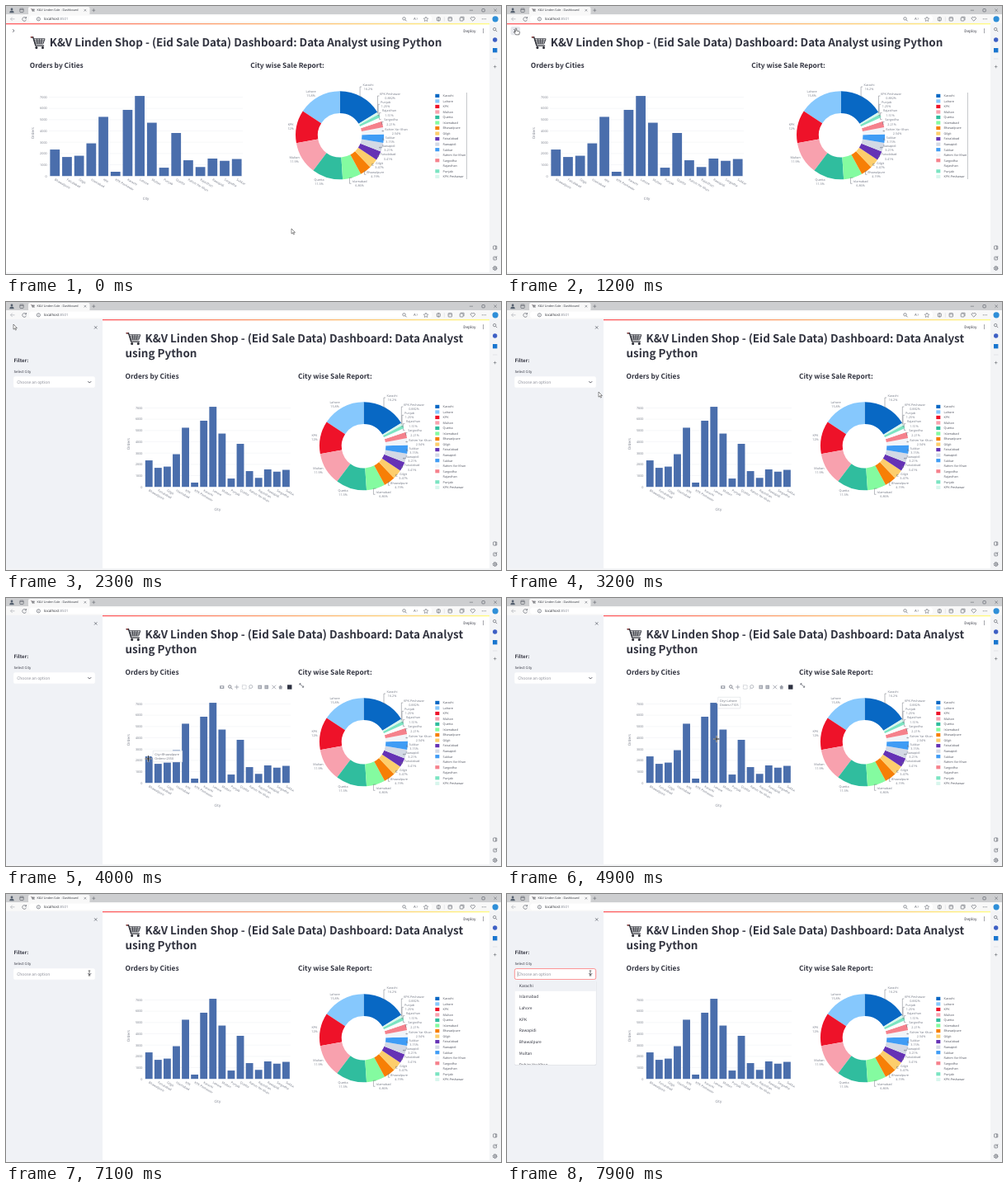
Animation of 600x325 px, one loop 8 s. Source, as an HTML page:

```html
<!DOCTYPE html>
<html lang="en">
<head>
<meta charset="utf-8">
<title>Sales dashboard</title>
<style>
  html, body { margin: 0; width: 100%; height: 100%; overflow: hidden; background: #f3f4f6; }
  svg { display: block; width: 600px; height: 325px; }
  text { text-rendering: geometricPrecision; white-space: pre; }
  .ui { font-family: "Noto Sans CJK JP", "Noto Sans CJK SC", "Noto Sans CJK", "Noto Sans", sans-serif; }
  .plot { font-family: "Open Sans", "Noto Sans", sans-serif; }
</style>
</head>
<body>
<svg id="stage" viewBox="0 0 600 325">
  <g id="scene"></g>
  <g id="chrome"></g>
  <g id="cursor"></g>
</svg>
<script>
const LOOP = 8000, STEP = 100, SIDE = 117, RIGHT = 558;
const INK = '#31333f', GREY = '#747986';
const TITLE = ['K&V Linden Shop - (Eid Sale Data) Dashboard: Data Analyst', 'using Python'];

const BARS = [
  ['Bhawalpure', 2350], ['Faisalabad', 1690], ['Gilgit', 1800], ['Islamabad', 2900],
  ['KPK', 5250], ['KPK-Peshawar', 380], ['Karachi', 5870], ['Lahore', 7105],
  ['Multan', 4730], ['Punjab', 740], ['Quetta', 3820], ['Rahim Yar Khan', 1400],
  ['Rajasthan', 800], ['Rawapidi', 1550], ['Sargodha', 1350], ['Sukkar', 1510]
];

// name, percent, colour, label centre relative to the ring centre
const SLICES = [
  ['Karachi', 16.2, '#0868c4', 34.5, -58.8], ['Lahore', 15.8, '#86c8fd', -35, -50.5],
  ['KPK', 12, '#ee1229', -59.5, -11], ['Multan', 11.9, '#f8a1ae', -55, 29.5],
  ['Quetta', 11.3, '#30bd9e', -25, 56], ['Islamabad', 6.86, '#84fba0', 24, 58.5],
  ['Bhawalpure', 4.19, '#f77f06', 43, 47.5], ['Gilgit', 3.47, '#fdce6c', 48, 36.5],
  ['Faisalabad', 3.41, '#6532b5', 58.5, 25.8], ['Rawapidi', 3.21, '#d3d9e5', 59, 15.2],
  ['Sukkar', 3.15, '#3f9cf5', 61, 5.5], ['Rahim Yar Khan', 2.54, '#f1f4f9', 68.5, -5],
  ['Sargodha', 2.21, '#f5818c', 62, -16.2], ['Rajasthan', 1.51, '#fcfcfd', 60, -27.2],
  ['Punjab', 1.25, '#7be4c2', 55.5, -37.5], ['KPK-Peshawar', 0.882, '#d8f6ed', 61, -47.8]
];
const RING = 53.5, HOLE = 26.8, TOTAL = SLICES.reduce((sum, s) => sum + s[1], 0);

const OPTIONS = ['Karachi', 'Islamabad', 'Lahore', 'KPK', 'Rawapidi', 'Bhawalpure', 'Multan', 'Rahim Yar Khan'];

const SIDE_KEYS = [[1900, 0], [2000, 7], [2100, 58], [2200, 104], [2300, SIDE]];
const CURSOR_KEYS = [
  [0, 346, 270], [200, 346, 270], [900, 20, 40], [1100, 11, 30], [1900, 11, 30], [2000, 9, 27],
  [2600, 9, 27], [3100, 111, 109], [3400, 111, 109], [4100, 176, 200], [4900, 254, 171],
  [5300, 256, 168], [5900, 467, 139], [6300, 467, 139], [7100, 101, 96]
];
const OPEN_AT = 7300;

const $ = id => document.getElementById(id);
const esc = s => String(s).replace(/&/g, '&amp;').replace(/</g, '&lt;');
const rect = (x, y, w, h, fill, more = '') =>
  `<rect x="${x}" y="${y}" width="${w}" height="${h}" fill="${fill}" ${more}/>`;
const disc = (x, y, r, fill, more = '') => `<circle cx="${x}" cy="${y}" r="${r}" fill="${fill}" ${more}/>`;
const line = (d, stroke = GREY, width = .6, more = '') =>
  `<path d="${d}" fill="none" stroke="${stroke}" stroke-width="${width}" ${more}/>`;
const group = (x, y, body) => `<g transform="translate(${x} ${y})">${body}</g>`;
// y is the middle of the capitals
const text = (x, y, str, size, fill = INK, cls = 'ui', more = '') =>
  `<text class="${cls}" x="${x}" y="${y + size * .35}" font-size="${size}" fill="${fill}" ${more}>${esc(str)}</text>`;
const label = (x, y, str, more = '', size = 3.75) => text(x, y, str, size, GREY, 'plot', more);
const BOLD = 'font-weight="700"', MID = 'text-anchor="middle"';

function at(keys, t) {
  let i = 0;
  while (i < keys.length - 1 && keys[i + 1][0] <= t) i++;
  const a = keys[i], b = keys[i + 1];
  if (!b || t <= a[0]) return a.slice(1);
  const p = (t - a[0]) / (b[0] - a[0]), e = p * p * (3 - 2 * p);
  return a.slice(1).map((v, k) => v + (b[k + 1] - v) * e);
}

function layout(side) {
  const left = 28.7 + side * (115.8 / SIDE), col = (RIGHT - left - 5) / 2;
  const dy = side > 28 ? 18 : 0;
  return {
    side, left, col, dy, col2: left + col + 5.3,
    barX: left + 23.2, pitch: (col - 27) / BARS.length, base: 206.2 + dy,
    cx: 404.6 + 28.9 * side / SIDE, cy: 156.8 + dy
  };
}
const barTop = (g, i) => g.base - BARS[i][1] * .01367;

// Karachi runs clockwise from the top, all the others anticlockwise
const arcs = (() => {
  let turn = 0;
  return SLICES.map((s, i) => {
    const span = s[1] / TOTAL * Math.PI * 2;
    if (i === 0) return [0, span];
    turn -= span;
    return [turn, turn + span];
  });
})();
const polar = (g, r, a) => [g.cx + r * Math.sin(a), g.cy - r * Math.cos(a)];

function hoverAt(g, x, y) {
  const i = Math.floor((x - g.barX) / g.pitch);
  if (i >= 0 && i < BARS.length && y < g.base && y > barTop(g, i)) return { kind: 'bar', i };
  const r = Math.hypot(x - g.cx, y - g.cy);
  if (r < HOLE || r > RING) return null;
  const a = Math.atan2(x - g.cx, g.cy - y), full = Math.PI * 2;
  const k = arcs.findIndex(([p, q]) => [a, a - full].some(v => v >= p && v < q));
  return k < 0 ? null : { kind: 'slice', i: k };
}

function cart() {
  return line('M0 1.2H2.8L6 11.6H16.2', '#2f3038', 1.4) +
    line('M3.6 3.3H17.2L15 9.4H5.4ZM4.3 5.4H16.4M5 7.4H15.7M7.5 3.3L8.2 9.4M10.4 3.3V9.4M13.4 3.3L12.6 9.4', '#34363f', .95) +
    line('M0 1.2H2.3', '#8f3a3b', 1.4) +
    disc(7, 14, 1.5, '#26272f') + disc(14.6, 14, 1.5, '#26272f');
}

function barChart(g) {
  const end = g.barX + g.pitch * BARS.length;
  let out = '';
  for (let k = 0; k <= 7; k++) {
    const y = g.base - k * 13.67;
    out += line(`M${g.barX} ${y}H${end}`, '#eceef2', .5) +
      label(g.barX - 2.2, y, k * 1000, 'text-anchor="end"');
  }
  BARS.forEach(([name], i) => {
    const x = g.barX + g.pitch * (i + .5), top = barTop(g, i), w = g.pitch * .8;
    out += rect(x - w / 2, top, w, g.base - top, '#4a6eac') +
      `<g transform="translate(${x} ${g.base + 4}) rotate(30)">${label(0, 0, name)}</g>`;
  });
  out += label((g.barX + end) / 2, g.base + 27.3, 'City', MID, 4.4) +
    `<g transform="translate(${g.left + 4.2} ${g.base - 52}) rotate(-90)">${label(0, 0, 'Orders', MID, 4.4)}</g>`;
  return `<clipPath id="col"><rect x="0" y="0" width="${g.left + g.col}" height="325"/></clipPath>` +
    `<g clip-path="url(#col)">${out}</g>`;
}

function pieChart(g) {
  let out = '';
  SLICES.forEach(([name, pct, fill, lx, ly], i) => {
    const [a, b] = arcs[i];
    const [p, q, r, s] = [polar(g, RING, a), polar(g, RING, b), polar(g, HOLE, b), polar(g, HOLE, a)];
    out += `<path fill="${fill}" d="M${p}A${RING} ${RING} 0 0 1 ${q}L${r}A${HOLE} ${HOLE} 0 0 0 ${s}Z"/>`;
    const x = g.cx + lx, y = g.cy + ly;
    if (i === 0 || i > 4) {
      const edge = x - name.length * 1.03 - .8, [mx, my] = polar(g, RING, (a + b) / 2);
      out += line(`M${mx} ${my}H${edge - 2}V${y}H${edge}`, '#70747f', .5);
    }
    out += label(x, y - 2.5, name, MID) + label(x, y + 2.6, pct + '%', MID);
    const row = 108.9 + g.dy + i * 6.53;
    out += rect(520.3, row - 2.1, 5, 4.2, fill) + text(529.6, row, name, 3.75, '#4e525e', 'plot');
  });
  if (!g.side) out += line('M558.4 105V210', '#a9acb4', .7);
  return out;
}

function sidebar(g, open) {
  if (!g.side) return '';
  let out = rect(0, 21, SIDE, 302, '#f0f2f6') +
    line('M107 29.2l3.4 3.4m0-3.4l-3.4 3.4', '#555964', .7) +
    text(9.5, 71, 'Filter:', 5.95, INK, 'ui', BOLD) +
    text(9.5, 84.3, 'Select City', 4.25) +
    rect(9.3, 90.6, 98.4, 13, '#fff', `rx="2.2" stroke="${open ? '#ff4b4b' : '#fff'}" stroke-width=".6"`) +
    text(13.2, 97, 'Choose an option', 4.9, '#8b8d98') +
    line('M99.4 96.2l1.9 1.9 1.9-1.9', INK, .8);
  if (open) {
    out += line('M13 93.8V100.3', INK, .4) +
      rect(9, 104.8, 99.4, 103.2, '#c9ccd4', 'rx="2" opacity=".5"') +
      rect(9.3, 104.2, 98.6, 103, '#fff', 'rx="2"') + rect(9.3, 104.6, 98.6, 13.2, '#eff1f5') +
      '<clipPath id="menu"><rect x="9" y="104" width="99" height="103"/></clipPath><g clip-path="url(#menu)">' +
      OPTIONS.map((name, i) => text(14.8, 111 + i * 13.7, name, 4.8)).join('') + '</g>';
  }
  return group(g.side - SIDE, 0, out);
}

function modebar(g, right, full) {
  const y = 90 + g.dy, x = right - 5, c = '#9da1ab';
  const lens = disc(-.5, -.5, 1.7, 'none', 'stroke="#555a66" stroke-width=".7"') + line('M.8 .8l1.8 1.8', '#555a66', .8);
  const plus = rect(-2.3, -2.3, 4.6, 4.6, c) + line('M-1.4 0H1.4M0-1.4V1.4', '#fff', .6);
  const icons = {
    72: lens,
    64: line('M-2.5 0H2.5M0-2.5V2.5', c, .8),
    55: rect(-2.3, -2.3, 4.6, 4.6, 'none', `stroke="${c}" stroke-width=".6" stroke-dasharray="1 .6"`),
    47: disc(0, -.5, 2, 'none', `stroke="${c}" stroke-width=".7"`) + line('M-1.5 1l-.6 1.6', c),
    36: plus,
    28: rect(-2.3, -2.3, 4.6, 4.6, c) + line('M-1.4 0H1.4', '#fff', .6),
    19: line('M-2.3-2.3L2.3 2.3M2.3-2.3L-2.3 2.3', c, .9),
    11: `<path d="M-2.7 .2L0-2.5 2.7 .2H1.8V2.4H-1.8V.2Z" fill="${c}"/>`
  };
  let out = group(x - (full ? 82 : 11), y, rect(-2.6, -1.8, 5.2, 3.8, c, 'rx=".5"') + disc(0, .1, 1.1, '#fff'));
  if (full) for (const k in icons) out += group(x - k, y, icons[k]);
  return out + rect(x - 2.7, y - 2.7, 5.4, 5.4, '#2c3040') +
    group(x + 14.5, y - 2, line('M-2.4-.5V-2.2H-.7M2.4 .5V2.2H.7M-2.2-2L2.2 2', '#4d515c', .7));
}

function tooltip(g, hit) {
  let x, y, rows;
  if (hit.kind === 'bar') {
    const [name, n] = BARS[hit.i];
    x = g.barX + g.pitch * (hit.i + .5) + 5;
    y = barTop(g, hit.i);
    rows = ['City=' + name, 'Orders=' + n];
  } else {
    const [name, pct] = SLICES[hit.i], [a, b] = arcs[hit.i];
    const [mx, my] = polar(g, 40, (a + b) / 2);
    x = mx + Math.min(15, (b - a) * 18 + 2);
    y = my;
    rows = ['City=' + name, 'Amount=' + Math.round(pct / 16.2 * 24303222).toLocaleString('en-US')];
  }
  const w = Math.max(...rows.map(r => r.length)) * 2.1 + 4;
  return `<path d="M${x - 2} ${y}l2-1.8v-5h${w}v13.6h-${w}v-5z" fill="#fff" stroke="#d3d6dd" stroke-width=".5"/>` +
    rows.map((r, i) => text(x + 2, y - 2.5 + i * 5, r, 3.75, '#6a6e7a', 'plot')).join('');
}

function scene(g, hit, zone, hot, open) {
  let out = rect(0, 21, 586, 302, '#fff') +
    rect(g.side, 20.9, 586 - g.side, 1.4, 'url(#warm)') +
    text(554.3, 30, 'Deploy', 4.6) +
    [-2, 0, 2].map(d => disc(578.5, 30 + d, .55, INK)).join('');
  if (!g.side) {
    if (hot) out += rect(4.5, 25, 11.5, 10.2, '#e6e8ed', 'rx="2"');
    out += line('M8.2 28.2l1.8 1.8-1.8 1.8', '#555964', .8);
  }
  out += group(g.left + 1.2, 36.5, cart());
  const lines = g.dy ? TITLE : [TITLE.join(' ')];
  lines.forEach((s, i) => { out += text(g.left + (i ? 0 : 24), 44 + i * 18, s, 13.45, INK, 'ui', BOLD); });
  out += text(g.left, 72 + g.dy, 'Orders by Cities', 8.38, INK, 'ui', BOLD) +
    text(g.col2, 72 + g.dy, 'City wise Sale Report:', 8.38, INK, 'ui', BOLD) +
    barChart(g) + pieChart(g);
  if (zone === 1) out += modebar(g, g.left + g.col, true);
  if (zone === 2) out += modebar(g, RIGHT + .5, false);
  if (hit) out += tooltip(g, hit);
  return out + sidebar(g, open);
}

function chrome() {
  const dark = '#50545e';
  const ring = (x, y, r, c = dark) => disc(x, y, r, 'none', `stroke="${c}" stroke-width=".6"`);
  const box = (x, y, s) => rect(x - s / 2, y - s / 2, s, s, 'none', `rx=".7" stroke="${dark}" stroke-width=".6"`);
  const find = (x, y) => ring(x - .5, y - .5, 1.7) + line(`M${x + .8} ${y + .8}l1.7 1.7`, dark, .7);
  return '<linearGradient id="warm"><stop offset="0" stop-color="#ff5a5f"/><stop offset="1" stop-color="#fffb80"/></linearGradient>' +
    rect(0, 0, 600, 10.2, '#cdced0') + rect(0, 10, 600, 10.9, '#f8f8f8') +
    rect(27, 1, 74.5, 10, '#f8f8f8', 'rx="2"') +
    disc(7, 3.9, 1.4, '#55606f') + '<path d="M4.3 8.2a2.7 2.7 0 0 1 5.4 0z" fill="#55606f"/>' +
    box(19, 5.3, 4.4) + line('M17 4.4H21.1', dark) +
    group(30.4, 3, '<g transform="scale(.25)">' + cart() + '</g>') +
    text(37.6, 5.2, 'K&V Linden Sale - Dashboard', 3.7, '#30343c', 'plot') +
    line('M94.6 3.9l2.6 2.6m0-2.6l-2.6 2.6', dark, .5) + line('M104.3 5.2h4m-2-2v4', dark, .5) +
    line('M561.8 5.2h4.2', dark, .5) + box(578.6, 5.2, 3.4) + line('M591.4 3.5l3.4 3.4m0-3.4l-3.4 3.4', dark, .5) +
    rect(28, 11.6, 488, 8, '#fff', 'rx="3.5"') +
    line('M10.5 15.8H5.5m2.2-2.2l-2.2 2.2 2.2 2.2', '#a2a5ac', .6) +
    line('M24.2 14.6a2.4 2.4 0 1 0 .3 2M24.5 13v1.9h-1.9', dark, .6) +
    ring(39.4, 15.8, 2.1) + line('M39.4 15.5v1.4M39.4 14.4v.5', dark, .5) +
    `<text class="plot" x="46" y="17.4" font-size="4.4" fill="#25282e">localhost<tspan fill="#858994">:8501</tspan></text>` +
    find(483, 15.8) + text(494, 15.6, 'A', 4.4, dark, 'plot') + line('M498 14.2q1 1 0 2.4', dark, .4) +
    `<path d="M509 13l.8 1.9 2 .2-1.5 1.4.4 2-1.7-1-1.7 1 .4-2-1.5-1.4 2-.2z" fill="none" stroke="${dark}" stroke-width=".5"/>` +
    box(524.3, 15.8, 4) + line('M524.3 13v5.6', dark, .5) + line('M531.3 13.2v5.4', '#d0d3d8', .5) +
    box(538.3, 15.8, 4.4) + line('M536.5 15h3.6', dark, .5) +
    box(552.2, 16, 4) + line('M550.7 13.2h4.4v4', dark, .5) +
    line('M565.8 18.2l-2.4-2.4a1.4 1.4 0 0 1 2.4-1.7 1.4 1.4 0 0 1 2.4 1.7z', dark, .6) +
    [-2, 0, 2].map(d => disc(579.3 + d, 15.8, .5, dark)).join('') +
    disc(593.1, 15.8, 3.6, '#2f8fd8') +
    rect(586, 20.9, 14, 305, '#f3f4f6') +
    find(592.7, 28.6) + disc(592.7, 41, 2.7, '#3d5fc4') + rect(590, 51, 5.4, 5.4, '#1976cf') +
    line('M590 64H595.5', '#d0d3d8', .5) + line('M590.9 73.6h3.6m-1.8-1.8v3.6', dark, .5) +
    box(592.7, 293, 4.2) + line('M593.7 291v4', dark, .6) +
    box(592.7, 306, 3.8) + line('M592.2 306.4l3-3', dark, .6) +
    ring(592.7, 318, 2) + ring(592.7, 318, .7) +
    disc(592.7, 318, 2.5, 'none', `stroke="${dark}" stroke-width=".7" stroke-dasharray=".9 1"`);
}

const POINTERS = {
  arrow: '<path d="M0 0V6.2L1.5 4.9 2.5 7.1 3.5 6.7 2.5 4.5H4.4Z" fill="#fff" stroke="#222" stroke-width=".5"/>',
  hand: '<path d="M-.8-2.6q.8-1 1.5 0V.1l3 .7q.8.3.6 1.3l-.7 2.7H-.4L-2.5 1.7q.2-1 1.7.1z" fill="#fff" stroke="#222" stroke-width=".55"/>',
  cross: line('M-4 0H4M0-4V4', '#fff', 1.7) + line('M-3.8 0H3.8M0-3.8V3.8', '#16181d', 1),
  beam: line('M-1.3-3H1.3M0-3V3M-1.3 3H1.3', '#222', .6)
};

let lastKey = '';
function draw(now) {
  const t = Math.floor(now % LOOP / STEP) * STEP;
  const g = layout(at(SIDE_KEYS, t)[0]), [x, y] = at(CURSOR_KEYS, t);
  const open = t >= OPEN_AT, hot = t >= 1000 && t < 1900;
  const inRows = y > 84 + g.dy && y < 242 + g.dy;
  const zone = !inRows || x < g.left ? 0 : x < g.left + g.col ? 1 : x > g.col2 && x < 580 ? 2 : 0;
  const hit = hoverAt(g, x, y);
  const key = [g.side, hit && hit.kind + hit.i, zone, hot, open].join();
  if (key !== lastKey) {
    $('scene').innerHTML = scene(g, hit, zone, hot, open);
    lastKey = key;
  }
  const inPlot = zone === 1 && x > g.barX && y < g.base && y > g.base - 100;
  const overBox = g.side === SIDE && x > 9 && x < 108 && y > 90 && y < 104;
  const kind = inPlot ? 'cross' : hot || (hit && hit.kind === 'slice') ? 'hand' : overBox ? 'beam' : 'arrow';
  $('cursor').innerHTML = group(x, y, POINTERS[kind]);
}

$('chrome').innerHTML = chrome();
const start = performance.now();
function tick() {
  draw(performance.now() - start);
  requestAnimationFrame(tick);
}
tick();
</script>
</body>
</html>
```
